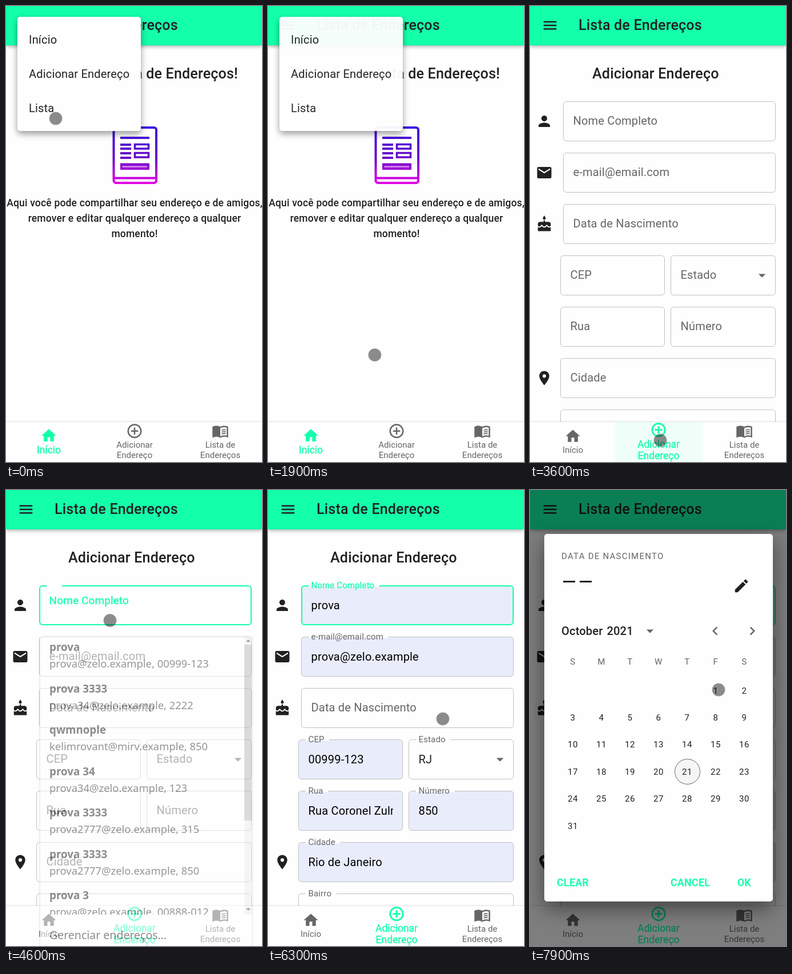
An HTML page for the animation above (8 s loop, 448x799 px).

```html
<!DOCTYPE html>
<html lang="pt-BR">
<head>
<meta charset="utf-8">
<title>Lista de Endereços</title>
<style>
  html, body { margin: 0; width: 100%; height: 100%; overflow: hidden; background: #fefefe; }
  svg { display: block; }
  text { font-family: Roboto, sans-serif; letter-spacing: .0094em; white-space: pre; }
  .medium { font-weight: 500; }
  .mid { text-anchor: middle; }
  .grey { fill: #666; }
  .accent { fill: #14ffaa; stroke: #14ffaa; stroke-width: .35px; }
  .nav text { letter-spacing: 0; }
  .heading { font-weight: 500; letter-spacing: .0075em; }
  .overline { letter-spacing: .0833em; }
  .caption { letter-spacing: .0333em; text-anchor: middle; }
  .button { font-weight: 500; letter-spacing: .0286em; }
  .list text { font-family: "Noto Sans", sans-serif; letter-spacing: 0; }
  .preview { font-family: "Liberation Sans", Arial, sans-serif; letter-spacing: 0; }
  .bar { filter: drop-shadow(0 2px 3px #0005); }
  .paper { filter: drop-shadow(0 5px 6px #0006); }
  .dialog { filter: drop-shadow(0 12px 18px #0007); }
</style>
</head>
<body>
<svg id="stage" width="448" height="799" viewBox="0 0 448 799" fill="#212121"></svg>
<script>
const LOOP = 8000, GREEN = '#14ffaa', PAGE = '#fefefe';

const ICONS = {
  menu: 'M3 18h18v-2H3zM3 13h18v-2H3zM3 6v2h18V6z',
  person: 'M12 12c2.21 0 4-1.79 4-4s-1.79-4-4-4-4 1.79-4 4 1.79 4 4 4zm0 2c-2.67 0-8 1.34-8 4v2h16v-2c0-2.66-5.33-4-8-4z',
  mail: 'M20 4H4c-1.1 0-2 .9-2 2v12c0 1.1.9 2 2 2h16c1.1 0 2-.9 2-2V6c0-1.1-.9-2-2-2zm0 4l-8 5-8-5V6l8 5 8-5v2z',
  cake: 'M12 6c1.11 0 2-.9 2-2 0-.38-.1-.73-.29-1.03L12 0l-1.71 2.97c-.19.3-.29.65-.29 1.03 0 1.1.9 2 2 2zm4.6 9.99l-1.07-1.07-1.08 1.07c-1.3 1.3-3.58 1.31-4.89 0l-1.07-1.07-1.09 1.07C6.75 16.64 5.88 17 4.96 17c-.73 0-1.4-.23-1.96-.61V21c0 .55.45 1 1 1h16c.55 0 1-.45 1-1v-4.61c-.56.38-1.23.61-1.96.61-.92 0-1.79-.36-2.44-1.01zM18 9h-5V7h-2v2H6c-1.66 0-3 1.34-3 3v1.54c0 1.08.88 1.96 1.96 1.96.52 0 1.02-.2 1.38-.57l2.14-2.13 2.13 2.13c.74.74 2.03.74 2.77 0l2.14-2.13 2.13 2.13c.37.37.86.57 1.38.57 1.08 0 1.96-.88 1.96-1.96V12C21 10.34 19.66 9 18 9z',
  place: 'M12 2C8.13 2 5 5.13 5 9c0 5.25 7 13 7 13s7-7.75 7-13c0-3.87-3.13-7-7-7zm0 9.5a2.5 2.5 0 0 1 0-5 2.5 2.5 0 0 1 0 5z',
  home: 'M10 20v-6h4v6h5v-8h3L12 3 2 12h3v8z',
  add: 'M13 7h-2v4H7v2h4v4h2v-4h4v-2h-4zM12 2a10 10 0 0 0 0 20 10 10 0 0 0 0-20zm0 18a8 8 0 0 1 0-16 8 8 0 0 1 0 16z',
  book: 'M21 5c-1.1-.35-2.3-.5-3.5-.5-1.95 0-4.05.4-5.5 1.5-1.45-1.1-3.55-1.5-5.5-1.5S2.45 4.9 1 6v14.6c0 .4.4.6.75.5C3.1 20.45 5.05 20 6.5 20c1.95 0 4.05.4 5.5 1.5 1.35-.85 3.8-1.5 5.5-1.5 1.65 0 3.35.3 4.75 1.05.35.15.75-.1.75-.45V6c-.6-.45-1.25-.75-2-1zm0 13.5c-1.1-.35-2.3-.5-3.5-.5-1.7 0-4.15.65-5.5 1.5V8c1.35-.85 3.8-1.5 5.5-1.5 1.2 0 2.4.15 3.5.5zM14 10.1q2.6-.9 5.6-.5v1.4q-3-.4-5.6.5zM14 12.8q2.6-.9 5.6-.5v1.4q-3-.4-5.6.5zM14 15.5q2.6-.9 5.6-.5v1.4q-3-.4-5.6.5z',
  edit: 'M3 17.25V21h3.75L17.81 9.94l-3.75-3.75zM20.71 7.04c.39-.39.39-1.02 0-1.41l-2.34-2.34c-.39-.39-1.02-.39-1.41 0l-1.83 1.83 3.75 3.75z',
  drop: 'M7 10l5 5 5-5z',
  left: 'M15.41 7.41L14 6l-6 6 6 6 1.41-1.41L10.83 12z',
  right: 'M10 6L8.59 7.41 13.17 12l-4.58 4.58L10 18l6-6z'
};

const text = (x, y, s, size = 20, cls = '', extra = '') =>
  `<text x="${x}" y="${y}" font-size="${size}" class="${cls}" ${extra}>${s}</text>`;
const icon = (name, cx, cy, cls = '') =>
  `<path d="${ICONS[name]}" fill-rule="evenodd" class="${cls}" transform="translate(${cx - 15} ${cy - 15}) scale(1.25)"/>`;
const rect = (x, y, w, h, extra = '') =>
  `<rect x="${x}" y="${y}" width="${w}" height="${h}" ${extra}/>`;

// on: when the label floats
const PREVIEW = 4850, FILLED = 5500;
const fields = [
  { x: 58, y: 167, w: 372, label: 'Nome Completo', value: 'prova', on: 4550, focus: true },
  { x: 58, y: 257, w: 372, label: 'e-mail@email.com', value: 'prova@zelo.example', on: PREVIEW },
  { x: 58, y: 347, w: 372, label: 'Data de Nascimento' },
  { x: 53, y: 437, w: 183, label: 'CEP', value: '00999-123', on: PREVIEW },
  { x: 246, y: 437, w: 184, label: 'Estado', value: 'RJ', on: 5820, plain: true },
  { x: 53, y: 527, w: 183, label: 'Rua', value: 'Rua Coronel Zulmiro', on: PREVIEW },
  { x: 246, y: 527, w: 184, label: 'Número', value: '850', on: PREVIEW },
  { x: 53, y: 617, w: 377, label: 'Cidade', value: 'Rio de Janeiro', on: PREVIEW },
  { x: 53, y: 707, w: 377, label: 'Bairro', value: '', on: 5820, plain: true }
];
const fieldMarkup = f => `<g class="field">
  <rect rx="5"/>
  <path stroke="${PAGE}" stroke-width="4"/>
  <svg x="${f.x}" y="${f.y}" width="${f.w - 17}" height="70">${text(17.5, 42, f.value || '', 20, '', f.plain ? '' : 'fill="#000"')}</svg>
  <text class="grey" font-size="20">${f.label}</text></g>`;

const tabs = [
  { x: 75, icon: 'home', lines: ['Início'] },
  { x: 225, icon: 'add', lines: ['Adicionar', 'Endereço'] },
  { x: 375, icon: 'book', lines: ['Lista de', 'Endereços'] }
];

const suggestions = [
  ['prova', 'prova@zelo.example, 00999-123'],
  ['prova 3333', 'prova34@zelo.example, 2222'],
  ['qwmnople', 'kelimrovant@mirv.example, 850'],
  ['prova 34', 'prova34@zelo.example, 123'],
  ['prova 3333', 'prova2777@zelo.example, 315'],
  ['prova 3333', 'prova2777@zelo.example, 850'],
  ['prova 3', 'prova@zelo.example, 00888-012']
];

const home = `<g id="home">
  ${text(406, 127, 'Bem-vindo a lista de Endereços!', 25, 'heading', 'text-anchor="end"')}
  <g fill="none" stroke="url(#ink)" stroke-width="4">
    ${rect(188.5, 213, 74.5, 97, 'rx="4"')}
    <path d="M188 301.5H263.01M200 231H251.01M200 243H219.01M200 250H219.01M200 258H219.01M200 266H219.01"/>
    ${rect(225.5, 242.5, 24, 7.5, 'stroke-width="3.5"')}
    ${rect(225.5, 257.5, 24, 7.5, 'stroke-width="3.5"')}
    ${rect(200, 275.5, 51, 11.5, 'fill="url(#ink)" stroke="none"')}
    <path d="M204 281.5H247" stroke="#f0c8ff" stroke-width="3" stroke-dasharray="1.5 1"/>
  </g>
  ${['Aqui você pode compartilhar seu endereço e de amigos,', 'remover e editar qualquer endereço a qualquer', 'momento!']
    .map((s, i) => text(225, 351 + 27.2 * i, s, 17.5, 'medium mid')).join('')}</g>`;

const form = `<g id="form">
  ${text(109, 127, 'Adicionar Endereço', 25, 'heading')}
  ${icon('person', 25, 202)}${icon('mail', 25, 292)}${icon('cake', 25, 382)}${icon('place', 25, 652)}
  ${fields.map(fieldMarkup).join('')}
  ${icon('drop', 406, 472, 'grey')}</g>`;

const nav = `<g class="nav">
  ${rect(0, 729, 448, 70, `fill="${PAGE}" style="filter:drop-shadow(0 -1px 1px #0002)"`)}
  <circle id="ripple" cx="228" cy="761" fill="${GREEN}" clip-path="url(#tabClip)"/>
  ${tabs.map(b => `<g class="tab"><g>${icon(b.icon, b.x, 0)}</g>
    ${b.lines.map(s => text(b.x, 0, s, 15, 'mid')).join('')}</g>`).join('')}</g>`;

const header = rect(0, 0, 448, 69, `fill="${GREEN}" class="bar"`) + icon('menu', 35, 34)
  + text(85, 42, 'Lista de Endereços', 25, 'heading');

const list = `<g id="list" class="list">
  ${rect(60, 257, 370, 546, 'fill="#fff" style="filter:drop-shadow(0 1px 2px #0005)"')}
  <g clip-path="url(#listClip)"><rect id="hover" x="60" y="257" width="357" height="69" fill="#dcdcdc"/>
  ${suggestions.map(([name, info], i) =>
    text(76, 282 + 72.5 * i, name, 18.8, '', 'font-weight="600"') + text(76, 311 + 72.5 * i, info, 18.4, '', 'fill="#333"')).join('')}</g>
  ${rect(417, 257, 13, 487, 'fill="#eee"')}${rect(417, 271, 13, 308, 'fill="#bbb"')}
  <path d="M420 266l4-4 4 4zM420 733l4 4 4-4z" fill="#444"/>
  ${text(76, 787, 'Gerenciar endereços…', 19.5)}</g>`;

let days = '';
for (let d = 1; d <= 31; d++) {
  const cell = d + 4;
  days += text(75 + 50 * (cell % 7), 356.5 + 47.4 * Math.floor(cell / 7), d, 15, 'caption');
}
const dialog = `${rect(0, 0, 448, 799, 'id="backdrop" fill="#000"')}
  <g id="dialog">${rect(25, 77, 400, 644, 'rx="5" fill="#fefefe" class="dialog"')}
  ${text(55, 121, 'DATA DE NASCIMENTO', 15, 'overline grey')}
  ${rect(58, 159, 21, 3)}${rect(87, 159, 21, 3)}
  ${icon('edit', 370, 168)}
  ${text(55, 254, 'October', 20, 'medium')}${text(134.5, 254, '2021', 20, 'medium')}
  ${icon('drop', 210, 247, 'grey')}${icon('left', 324, 247, 'grey')}${icon('right', 389, 247, 'grey')}
  ${[...'SMTWTFS'].map((s, i) => text(75 + 50 * i, 306, s, 15, 'caption grey')).join('')}
  <circle cx="275.5" cy="493.5" r="22" fill="#f5f5f5" stroke="#666"/>${days}
  ${text(47, 694, 'CLEAR', 17.5, 'button accent')}${text(246, 694, 'CANCEL', 17.5, 'button accent')}
  ${text(363, 694, 'OK', 17.5, 'button accent')}</g>`;

const menu = `<g id="menu">${rect(20, 19, 216, 200, 'rx="5" fill="#fefefe" class="paper"')}
  ${['Início', 'Adicionar Endereço', 'Lista'].map((s, i) => text(40, 66 + 60 * i, s)).join('')}</g>`;

const stage = document.getElementById('stage');
stage.innerHTML = `<defs>
  <linearGradient id="ink" gradientUnits="userSpaceOnUse" x1="0" y1="211" x2="0" y2="312">
    <stop stop-color="#3a10e0"/><stop offset=".55" stop-color="#6a08c8"/><stop offset="1" stop-color="#e600e6"/></linearGradient>
  <clipPath id="tabClip">${rect(148, 729, 154, 70)}</clipPath>
  <clipPath id="listClip">${rect(60, 257, 370, 487)}</clipPath></defs>
  ${rect(0, 0, 448, 799, `fill="${PAGE}"`)}${home}${form}${nav}${header}${list}${dialog}${menu}
  <circle id="pointer" r="11.5" fill="#000" fill-opacity=".45" stroke="#fff" stroke-opacity=".35"/>`;

const el = id => document.getElementById(id);
const set = (node, attrs) => { for (const k in attrs) node.setAttribute(k, attrs[k]); };
const show = (node, visible) => { node.style.display = visible ? '' : 'none'; };
const progress = (t, from, to) => Math.min(1, Math.max(0, (t - from) / (to - from)));
const ease = p => p * p * (3 - 2 * p);
const fade = (node, opacity) => { show(node, opacity > 0); set(node, { opacity }); };

// time, x, y
const path = [
  [0, 87, 197], [150, 87, 197], [500, 111, 129], [700, 111, 129], [900, 112, 128], [1020, 112, 128],
  [1100, 162, 297], [1200, 162, 297], [1400, 227, 753], [1500, 227, 753], [1900, 187, 611], [2300, 135, 762],
  [2400, 135, 762], [2700, 236, 775], [2800, 236, 775], [3000, 228, 761], [3700, 228, 761], [4000, 268, 618],
  [4400, 184, 200], [4500, 184, 200], [4800, 178, 285], [5400, 178, 285], [5800, 294, 396], [6000, 313, 419],
  [6200, 313, 419], [6300, 306, 401], [6600, 294, 373], [6900, 294, 373], [7200, 349, 384], [7300, 349, 384],
  [7600, 339, 365], [7700, 339, 365], [7900, 330, 350], [LOOP, 330, 350]
];
function movePointer(t) {
  const i = path.findIndex(k => k[0] > t);
  const [t0, x0, y0] = path[i - 1], [t1, x1, y1] = path[i];
  const p = progress(t, t0, t1);
  set(el('pointer'), { cx: x0 + (x1 - x0) * p, cy: y0 + (y1 - y0) * p });
}

const fieldNodes = [...document.querySelectorAll('.field')].map(g => ({
  box: g.children[0], notch: g.children[1], value: g.querySelector('svg text'), label: g.lastElementChild
}));
const labelWidths = fieldNodes.map(n => n.label.getComputedTextLength());

function drawField(f, n, labelWidth, t) {
  const up = f.on ? ease(progress(t, f.on, f.on + 170)) : 0;
  const focused = f.focus && t >= f.on;
  const hasValue = f.value && t >= (f.focus ? PREVIEW : f.on);
  const preview = !f.plain && t < FILLED;
  const border = focused ? 2 : 1;
  set(n.box, {
    x: f.x + border / 2, y: f.y + border / 2, width: f.w - border, height: 70 - border,
    fill: hasValue && !f.plain ? '#e8ecfb' : 'none',
    stroke: focused ? GREEN : '#c0c0c0', 'stroke-width': border
  });
  set(n.notch, { d: `M${f.x + 13} ${f.y + .5}h${(labelWidth * .75 + 13) * up}` });
  show(n.notch, up > 0);
  show(n.value, hasValue);
  set(n.value, { class: preview ? 'preview' : '', 'font-size': preview ? 16.67 : 20 });
  set(n.label, {
    transform: `translate(${f.x + 17.5} ${f.y + 41 - 36 * up}) scale(${1 - .25 * up})`,
    class: focused ? 'accent' : 'grey'
  });
}

// Icon and label lines are stacked and centred as one block.
function drawTab(b, g, selected, active) {
  const size = 15 + 2.5 * selected;
  const ascent = Math.round(.927 * size), lineHeight = ascent + 4;
  const top = 762.75 - (30 + b.lines.length * lineHeight) / 2;
  g.setAttribute('class', active ? 'tab accent' : 'tab grey');
  set(g.children[0], { transform: `translate(0 ${top + 15})` });
  [...g.querySelectorAll('text')].forEach((line, i) =>
    set(line, { y: Math.round(top + 30 + ascent + lineHeight * i), 'font-size': size }));
}
const tabNodes = [...document.querySelectorAll('.tab')];

function draw(t) {
  const onForm = t >= 3200;
  show(el('home'), !onForm);
  show(el('form'), onForm);
  if (onForm) fields.forEach((f, i) => drawField(f, fieldNodes[i], labelWidths[i], t));

  const switched = ease(progress(t, 3200, 3400));
  [1 - switched, switched, 0].forEach((s, i) =>
    drawTab(tabs[i], tabNodes[i], s, i === (onForm ? 1 : 0)));
  set(el('ripple'), { r: 20 + 90 * ease(progress(t, 3150, 3550)) });
  fade(el('ripple'), t < 3150 ? 0 : .2 * (1 - progress(t, 3150, 3800)));

  const closing = ease(progress(t, 1870, 2130));
  const shrink = ease(progress(t, 1960, 2130));
  fade(el('menu'), 1 - closing);
  set(el('menu'), { transform: `translate(20 19) scale(${1 - .25 * shrink} ${1 - .44 * shrink}) translate(-20 -19)` });

  fade(el('list'), progress(t, 4550, 4650) * (1 - progress(t, 5180, 5480)));
  show(el('hover'), t >= 4750);
  const opening = ease(progress(t, 6740, 7040));
  fade(el('backdrop'), .5 * opening);
  fade(el('dialog'), opening);
  movePointer(t);
}

function tick() {
  draw(performance.now() % LOOP);
  requestAnimationFrame(tick);
}
tick();
</script>
</body>
</html>
```
